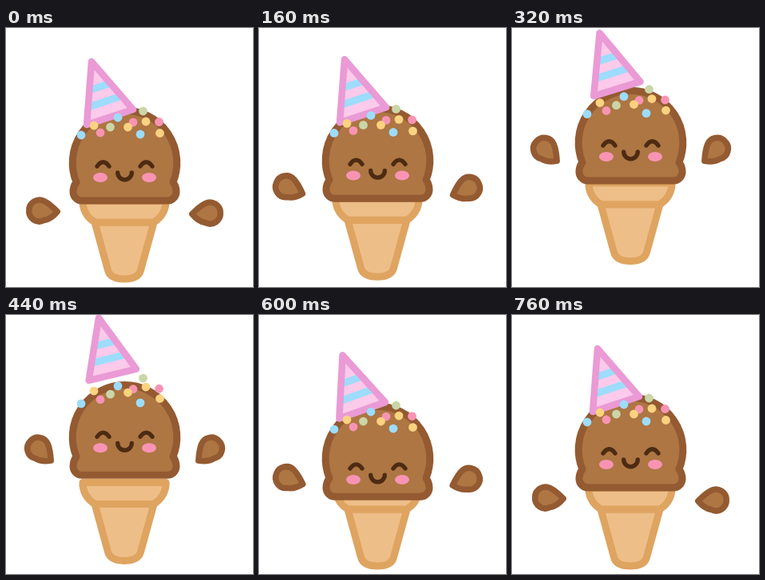
Animation of 309x324 px, one loop 800 ms. Source, as an HTML page with a canvas:

```html
<!DOCTYPE html>
<html lang="en">
<head>
<meta charset="utf-8">
<title>Party ice cream</title>
<style>
  html, body { margin: 0; width: 100%; height: 100%; overflow: hidden; background: #fff; }
  canvas { display: block; }
</style>
</head>
<body>
<canvas id="stage" width="309" height="324"></canvas>
<script>
const ctx = document.getElementById('stage').getContext('2d');
const LOOP = 800, STEP = 40, TAKEOFF = 150;

const COLOR = {
  crust: '#945a31', choc: '#ad7643', waffle: '#eebe88', waffleEdge: '#dea460',
  hat: '#fccaea', hatEdge: '#ea9ad5', dark: '#4d2b12',
  blue: '#9edcfb', yellow: '#fbd280', pink: '#f794b3', green: '#cad6a8'
};

const SHAPES = {
  coneBody: new Path2D('M111 243L127.5 303Q130.5 314 148 314Q165.5 314 168.5 303L185 243Z'),
  coneRim: new Path2D('M96 216V220Q98 235 111 243H185Q198 235 200 220V216Z'),
  scoop: new Path2D('M88 193A65.3 65.3 0 1 1 209 193Q213 198 213 205A11 11 0 0 1 202 216H95A11 11 0 0 1 84 205Q84 198 88 193Z'),
  features: new Path2D('M114 173Q121.5 162.5 129 173M168 173Q175.5 162.5 183 173M139.7 181A8.8 8.8 0 0 0 157.3 181'),
  hat: new Path2D('M6 -79L0 0L58 -19Z'),
  arm: new Path2D('M-13 0A13 13 0 0 1 6 -11.5Q13 -8 22.5 1.5Q15 11 6 12.5A13 13 0 0 1 -13 0Z')
};

// Looser sprinkles fly higher and land later.
const SPRINKLES = [
  { color: 'blue', loose: .1, spots: [[94, 134], [140, 112], [168, 133]] },
  { color: 'green', loose: .5, spots: [[130.5, 124], [171.5, 104]] },
  { color: 'pink', loose: .6, spots: [[118, 131], [159, 118], [191.5, 117.5]] },
  { color: 'yellow', loose: 1, spots: [[110, 122], [152.5, 124], [175, 117], [192.5, 131.5]] }
];

const progress = (t, from, to) => Math.min(1, Math.max(0, (t - from) / (to - from)));
const ease = u => u * u * (3 - 2 * u);

// Height of a thrown body between take-off and landing.
function hop(t, from, to, height) {
  const u = progress(t, from, to);
  return 4 * height * u * (1 - u);
}

// How far the landing presses things down, 0 to 1.
const sink = t => Math.sin(Math.PI * progress(t, 500, 740)) ** 2;

function pose(t) {
  const press = sink(t);
  const scoop = 12 * press - hop(t, TAKEOFF, 510, 25);
  const toss = hop(t, 275, 610, 1);
  return {
    cone: -hop(t, TAKEOFF, 465, 22.5),
    scoop,
    face: 20.4 * press - hop(t, TAKEOFF, 545, 26.5),
    sprinkle: loose => 9.7 * press - hop(t, TAKEOFF, 565 + 25 * loose, 27 + 3 * loose),
    hat: { x: 101 + 2.6 * toss - press, y: 121 + scoop - 23.5 * toss, turn: 4.6 * toss ** 2 - 1.5 * press },
    raise: ease(progress(t, 0, 320)) - ease(progress(t, 440, 745))
  };
}

function paint(shape, fill, edge, width = 9) {
  ctx.fillStyle = fill;
  ctx.fill(shape);
  ctx.strokeStyle = edge;
  ctx.lineWidth = width;
  ctx.stroke(shape);
}

function oval(x, y, rx, ry, fill) {
  ctx.fillStyle = fill;
  ctx.beginPath();
  ctx.ellipse(x, y, rx, ry, 0, 0, Math.PI * 2);
  ctx.fill();
}

function placed(x, y, degrees, draw) {
  ctx.save();
  ctx.translate(x, y);
  ctx.rotate(degrees * Math.PI / 180);
  draw();
  ctx.restore();
}

function stripe(x1, y1, x2, y2) {
  ctx.beginPath();
  ctx.moveTo(x1, y1);
  ctx.lineTo(x2, y2);
  ctx.lineWidth = 9;
  ctx.strokeStyle = COLOR.blue;
  ctx.stroke();
}

function drawHat() {
  ctx.fillStyle = COLOR.hat;
  ctx.fill(SHAPES.hat);
  ctx.save();
  ctx.clip(SHAPES.hat);
  ctx.lineCap = 'butt';
  stripe(3, -43, 27, -51);
  stripe(2, -22, 44, -36);
  ctx.restore();
  ctx.strokeStyle = COLOR.hatEdge;
  ctx.lineWidth = 8.5;
  ctx.stroke(SHAPES.hat);
}

// Each arm floats on a circle around its hidden shoulder.
function drawArms(lift, raise) {
  const swing = -30 + 57 * raise;
  const arm = () => placed(92, 199 + lift, swing, () =>
    placed(-58, 0, 22 - .28 * swing, () => paint(SHAPES.arm, COLOR.choc, COLOR.crust, 7.5)));
  arm();
  ctx.save();
  ctx.translate(297, 3 * (1 - raise));
  ctx.scale(-1, 1);
  arm();
  ctx.restore();
}

function drawFace() {
  for (const x of [118, 179]) oval(x, 187, 9, 6, COLOR.pink);
  ctx.strokeStyle = COLOR.dark;
  ctx.lineWidth = 5.3;
  ctx.stroke(SHAPES.features);
}

function draw(t) {
  const p = pose(t);
  ctx.fillStyle = '#fff';
  ctx.fillRect(0, 0, 309, 324);
  ctx.lineCap = ctx.lineJoin = 'round';

  drawArms(p.cone, p.raise);
  placed(0, p.cone, 0, () => {
    paint(SHAPES.coneBody, COLOR.waffle, COLOR.waffleEdge);
    paint(SHAPES.coneRim, COLOR.waffle, COLOR.waffleEdge);
  });
  placed(0, p.scoop, 0, () => paint(SHAPES.scoop, COLOR.choc, COLOR.crust));
  placed(0, p.face, 0, drawFace);
  placed(p.hat.x, p.hat.y, p.hat.turn, drawHat);
  for (const { color, loose, spots } of SPRINKLES) {
    for (const [x, y] of spots) oval(x, y + p.sprinkle(loose), 5.4, 5.4, COLOR[color]);
  }
}

let start;
function tick(now) {
  start ??= now;
  draw(Math.floor((now - start) % LOOP / STEP) * STEP);
  requestAnimationFrame(tick);
}
draw(0);
requestAnimationFrame(tick);
</script>
</body>
</html>
```
